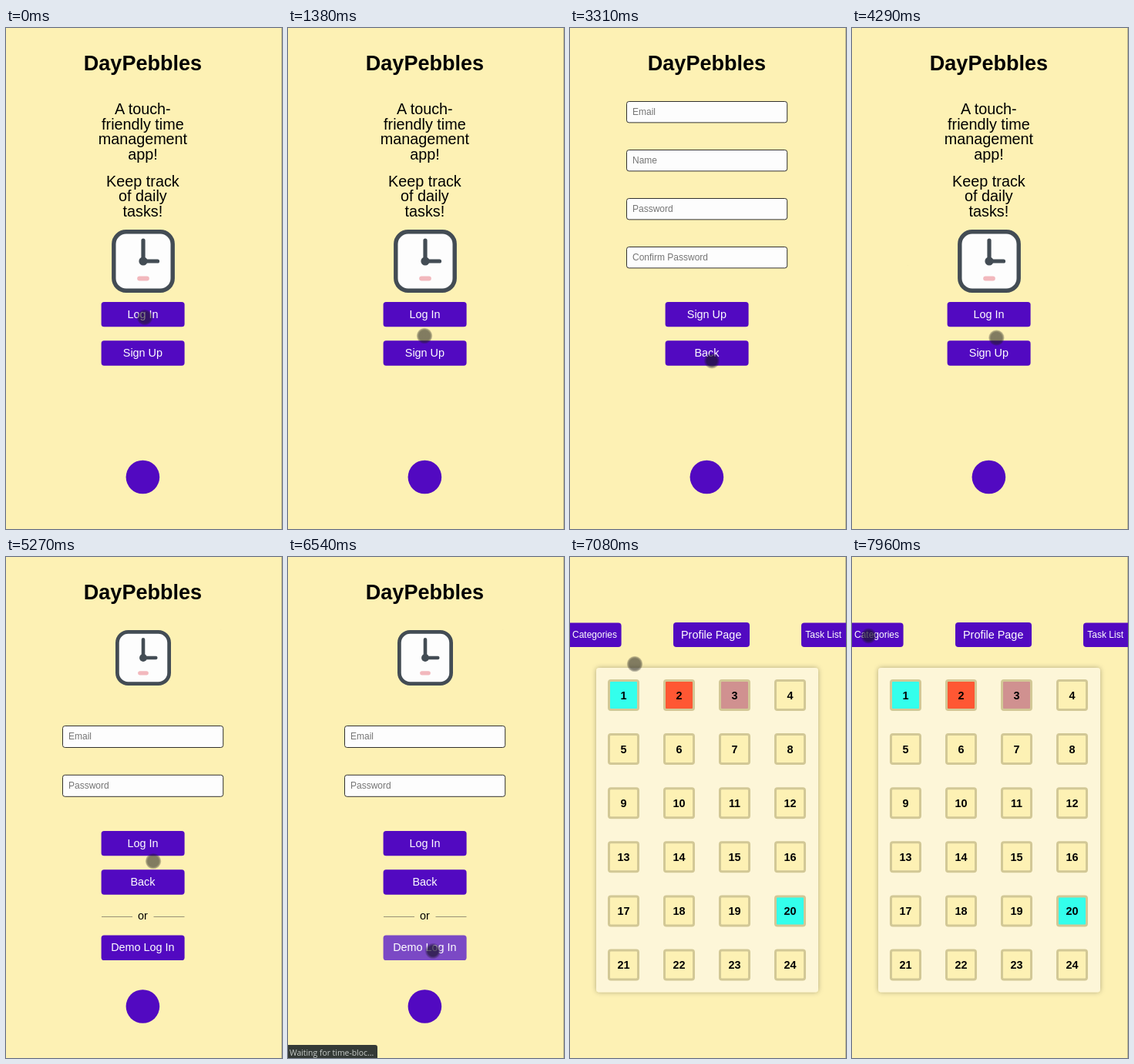
Write an HTML page that moves like this. It is 358x651 px and loops after 8 s.

```html
<!DOCTYPE html>
<html lang="en">
<head>
<meta charset="utf-8">
<title>DayPebbles</title>
<style>
  html, body { margin: 0; width: 100%; height: 100%; overflow: hidden; background: #fdf1b4; }
  svg { display: block; width: 358px; height: 651px; font-family: "Liberation Sans", Arial, sans-serif; }
  .status { font-family: "Open Sans", "Noto Sans", sans-serif; }
</style>
</head>
<body>
<svg id="stage" viewBox="0 0 358 651"></svg>
<script>
const LOOP = 8000, MID = 177.4, PURPLE = '#5209c1';

const text = (x, y, size, label, attrs = '') =>
  `<text x="${x}" y="${y}" font-size="${size}" text-anchor="middle" ${attrs}>${label}</text>`;
const rect = (x, y, w, h, r, fill, attrs = '') =>
  `<rect x="${x}" y="${y}" width="${w}" height="${h}" rx="${r}" fill="${fill}" ${attrs}/>`;
const group = (id, ...parts) => `<g id="${id}">${parts.join('')}</g>`;

const button = (y, label, id = '') =>
  rect(123.6, y, 108, 32.4, 3.6, PURPLE, id && `id="${id}"`) +
  text(MID, y + 20.8, 14.4, label, 'fill="#fff"');

const input = (y, label, h = 27.4) =>
  rect(73.5, y, 208.2, h, 3, '#fdfdfd', 'stroke="#1a1a1a" stroke-width=".9"') +
  text(81, y + 17.6, 12, label, 'fill="#757575" style="text-anchor:start"');

const clock = (y, scale) => `
  <g transform="translate(178 ${y}) scale(${scale})">
    ${rect(-38.2, -38.2, 76.4, 76.4, 16, '#fdfdfd', 'stroke="#434c54" stroke-width="5.4"')}
    <path d="M0-27V0H18.5" fill="none" stroke="#434c54" stroke-width="5.2" stroke-linecap="round"/>
    <circle r="5.6" fill="#434c54"/>
    ${rect(-7.8, 19.5, 15.6, 6, 3, '#f2b8bd')}
  </g>`;

const lines = (y, ...rows) =>
  rows.map((row, i) => text(MID, y + i * 19.8, 19.8, row)).join('');
const badge = y => `<circle cx="${MID}" cy="${y}" r="21.8" fill="${PURPLE}"/>`;
const navButton = (x, w, y, h, textX, size, label) =>
  rect(x, y, w, h, 4, PURPLE) + text(textX, 101 + size * .35, size, label, 'fill="#fff"');

const hourFills = { 1: '#33ffec', 2: '#ff5733', 3: '#d09190', 20: '#33ffec' };
const hours = Array.from({ length: 24 }, (_, i) => {
  const x = 50.5 + i % 4 * 72, y = 160.5 + Math.floor(i / 4) * 70.1;
  return rect(x, y, 38, 38, 2.5, hourFills[i + 1] || '#fdf1b4', 'stroke="#d2c896" stroke-width="3"') +
    text(x + 19, y + 24.3, 14.4, i + 1, 'font-weight="bold"');
});

const stage = document.getElementById('stage');
stage.innerHTML = `
  <defs>
    <radialGradient id="touch">
      <stop offset=".7" stop-color="#1c1c1c" stop-opacity=".55"/>
      <stop offset=".85" stop-color="#1c1c1c" stop-opacity=".4"/>
      <stop offset="1" stop-color="#1c1c1c" stop-opacity=".12"/>
    </radialGradient>
    <radialGradient id="press">
      <stop offset=".65" stop-color="#1c1430" stop-opacity=".7"/>
      <stop offset="1" stop-color="#1c1430" stop-opacity=".08"/>
    </radialGradient>
    <filter id="shadow" x="-10%" y="-10%" width="120%" height="120%">
      <feDropShadow dx="0" dy="0" stdDeviation="3" flood-opacity=".3"/>
    </filter>
  </defs>
  ${rect(0, 0, 358, 651, 0, '#fdf1b4')}
  ${rect(357, 0, 1, 651, 0, '#bdb58e')}` +
  group('header', text(MID, 55, 27, 'DayPebbles', 'font-weight="bold"')) +
  group('home',
    lines(111.8, 'A touch-', 'friendly time', 'management', 'app!'),
    lines(205.5, 'Keep track', 'of daily', 'tasks!'),
    clock(303, 1), button(355.9, 'Log In'), button(406.3, 'Sign Up'), badge(583.5)) +
  group('signup',
    ...['Email', 'Name', 'Password', 'Confirm Password'].map((label, i) => input(95.5 + i * 63, label)),
    button(355.9, 'Sign Up'), button(406.3, 'Back'), badge(583.5)) +
  group('login',
    clock(131, .88), input(219.5, 'Email', 28), input(283.3, 'Password', 28),
    button(355.9, 'Log In'), button(406.3, 'Back'),
    '<path d="M124 467.5H164M191.5 467.5H231.5" stroke="#999377"/>',
    text(MID, 470.8, 14.4, 'or'), button(491.6, 'Demo Log In', 'demo'), badge(584)) +
  group('calendar',
    navButton(-6, 72.6, 85.5, 31.5, 32, 12, 'Categories'),
    navButton(134, 99, 85, 32, 183.2, 14.4, 'Profile Page'),
    navButton(300, 70, 85.5, 31.5, 328.7, 12, 'Task List'),
    rect(34, 144, 288, 421.5, 4, '#fdf6d8', 'filter="url(#shadow)"'), ...hours) +
  group('status',
    '<path d="M0 634H113Q116 634 116 637V651H0Z" fill="#343a36"/>',
    text(2, 648, 10.4, 'Waiting for time-bloc...', 'class="status" fill="#c6cbc8" style="text-anchor:start"')) +
  '<circle id="cursor" r="10.3"/>';

const el = id => document.getElementById(id);
const show = (id, visible) => el(id).style.display = visible ? '' : 'none';
const within = (t, from, to) => t >= from && t < to;

const screens = [[0, 'home'], [2060, 'signup'], [3810, 'home'], [4770, 'login'], [6610, 'calendar']];
const presses = [[1760, 2060], [3310, 3810], [4500, 4770], [6260, 6610], [7960, LOOP]];
// time, x, y
const path = [
  [0, 180, 376], [1010, 180, 376], [1760, 174, 424.5],
  [2280, 174, 424.5], [2860, 184.5, 390], [2960, 184.5, 390], [3310, 184, 432.5],
  [4020, 184, 432.5], [4500, 190, 379.5], [5190, 190, 379.5], [5270, 191, 395],
  [5480, 197, 450], [5750, 188, 512], [6720, 188, 512], [7080, 84, 139],
  [7330, 84, 139], [7780, 21.5, 102.5], [LOOP, 21.5, 102.5]
];

function cursorAt(t) {
  const i = path.findIndex(key => key[0] > t);
  const [t0, x0, y0] = path[i - 1], [t1, x1, y1] = path[i];
  const k = (t - t0) / (t1 - t0);
  return [x0 + (x1 - x0) * k, y0 + (y1 - y0) * k];
}

function draw(t) {
  const screen = screens.filter(([from]) => from <= t).pop()[1];
  for (const id of ['home', 'signup', 'login', 'calendar']) show(id, id === screen);
  show('header', screen !== 'calendar');
  show('status', within(t, 6470, 6890));
  el('demo').setAttribute('fill', within(t, 6330, 6610) ? '#7b49c5' : PURPLE);

  const [x, y] = cursorAt(t);
  const pressed = presses.some(([from, to]) => within(t, from, to));
  el('cursor').setAttribute('transform', `translate(${x} ${y})`);
  el('cursor').setAttribute('fill', `url(#${pressed ? 'press' : 'touch'})`);
}

const start = performance.now();
function tick() {
  draw((performance.now() - start) % LOOP);
  requestAnimationFrame(tick);
}
tick();
</script>
</body>
</html>
```
